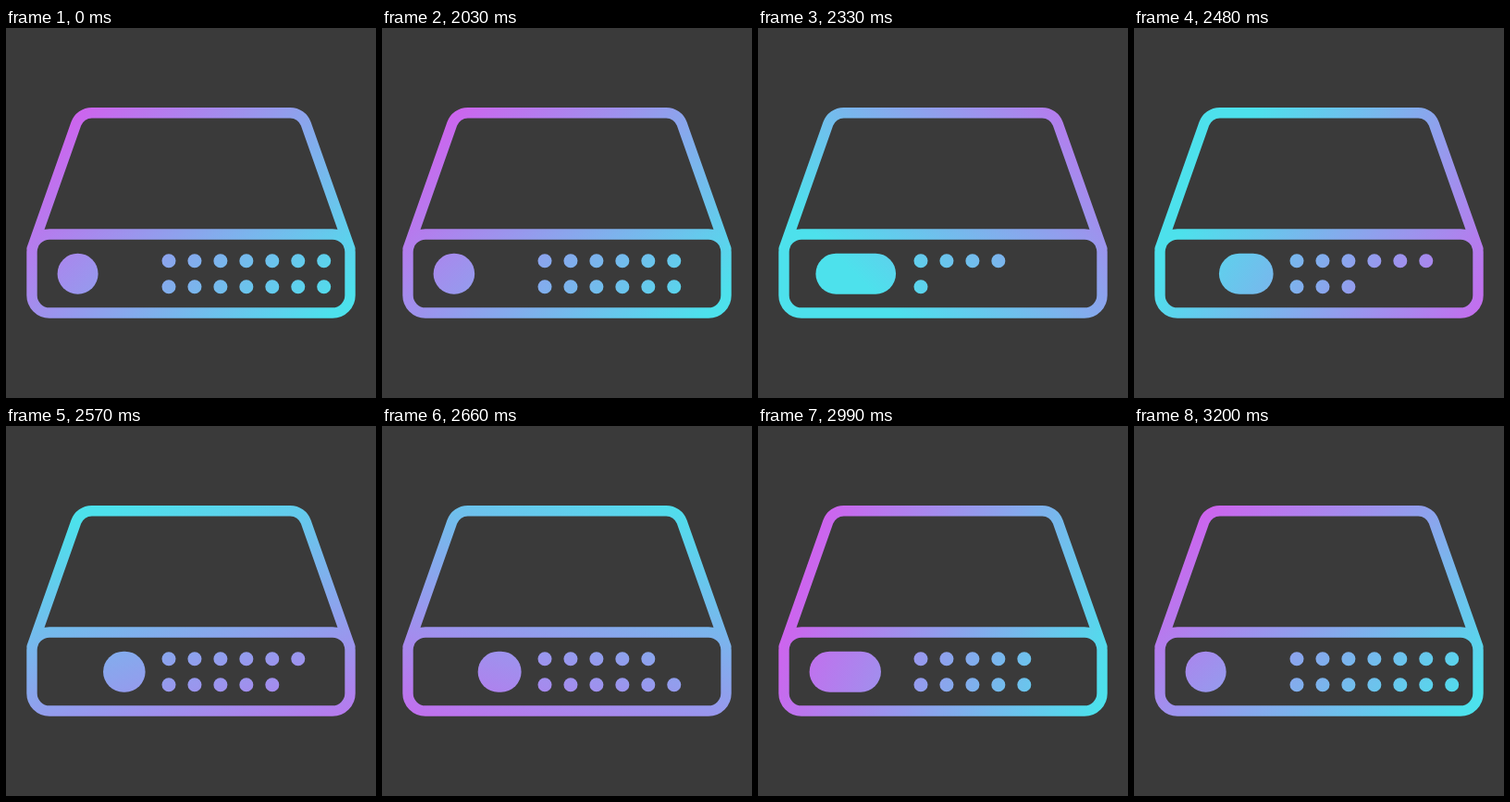
An HTML page with a canvas for the animation above (3.23 s loop, 400 px wide and 400 px high).

```html
<!DOCTYPE html>
<html lang="en">
<head>
<meta charset="utf-8">
<title>Router</title>
<style>
  html, body { margin: 0; width: 100%; height: 100%; overflow: hidden; background: #3a3a3a; }
  canvas { display: block; width: 400px; height: 400px; }
</style>
</head>
<body>
<canvas id="stage" width="400" height="400"></canvas>
<script>
const ctx = document.getElementById('stage').getContext('2d');
const LOOP = 3230, HOLD = 2000, STEP = 30;
const PURPLE = '#cd64ee', CYAN = '#4de1ec';

// Keys are [step, value] pairs.
const ANGLE = [[0, 0], [6, 22], [11, 90], [19, 208], [27, 293], [40, 360]];
const SHIFT = [[0, -10], [6, 15], [11, 60], [19, 45], [27, -20], [40, -10]];
const TOP_ROW = [[0, 1], [7, .35], [18, .95], [28, .55], [40, 1]];
const BOTTOM_ROW = [[0, 1], [10, .1], [22, .85], [30, .6], [40, 1]];

const smooth = u => {
  u = Math.min(1, Math.max(0, u));
  return u * u * (3 - 2 * u);
};
const ramp = (s, from, to) => smooth((s - from) / (to - from));

function segment(keys, s) {
  let i = 0;
  while (i < keys.length - 2 && s >= keys[i + 1][0]) i++;
  return i;
}

function eased(keys, s) {
  const i = segment(keys, s), [a, va] = keys[i], [b, vb] = keys[i + 1];
  return va + (vb - va) * ramp(s, a, b);
}

// Hermite curve through the keys, at rest at both ends.
function spline(keys, s) {
  const slope = j => j === 0 || j === keys.length - 1 ? 0 :
    (keys[j + 1][1] - keys[j - 1][1]) / (keys[j + 1][0] - keys[j - 1][0]);
  const i = segment(keys, s), [a, va] = keys[i], [b, vb] = keys[i + 1];
  const span = b - a, u = (s - a) / span, v = 1 - u;
  return va + (vb - va) * smooth(u) +
    span * u * v * (v * slope(i) - u * slope(i + 1));
}

function gradient(k) {
  const angle = (spline(ANGLE, k) - 135) * Math.PI / 180;
  const shift = spline(SHIFT, k), half = 174;
  const at = d => [200 + d * Math.cos(angle), 200 + d * Math.sin(angle)];
  const g = ctx.createLinearGradient(...at(shift + half), ...at(shift - half));
  g.addColorStop(0, PURPLE);
  g.addColorStop(1, CYAN);
  return g;
}

function drawCase() {
  ctx.lineWidth = 11.4;
  ctx.lineCap = 'round';
  ctx.beginPath();
  ctx.roundRect(28, 223, 344, 85, 19);
  ctx.moveTo(28, 239);
  ctx.arcTo(80, 91.7, 200, 91.7, 18);
  ctx.arcTo(320, 91.7, 372, 239, 18);
  ctx.lineTo(372, 239);
  ctx.stroke();
}

function drawPill(s) {
  const left = 77.6 + 51 * (ramp(s, 8, 20) - ramp(s, 20, 32));
  const right = 77.6 + 51 * (ramp(s, 0, 12) - ramp(s, 28, 40));
  ctx.beginPath();
  ctx.roundRect(left - 22, 243.7, right - left + 44, 44, 22);
  ctx.fill();
}

function drawDots(level, y) {
  const count = Math.floor(level * 6 + 1.01);
  for (let i = 0; i < count; i++) {
    ctx.beginPath();
    ctx.arc(176 + 27.95 * i, y, 7.5, 0, Math.PI * 2);
    ctx.fill();
  }
}

function frame(now) {
  const k = Math.max(0, Math.floor((now % LOOP - HOLD) / STEP));
  const s = Math.max(0, k - .25);
  ctx.fillStyle = '#3a3a3a';
  ctx.fillRect(0, 0, 400, 400);
  ctx.fillStyle = ctx.strokeStyle = gradient(k);
  drawCase();
  drawPill(s);
  drawDots(eased(TOP_ROW, s), 251.7);
  drawDots(eased(BOTTOM_ROW, s), 279.7);
}

let start;
function tick(now) {
  start ??= now;
  frame(now - start);
  requestAnimationFrame(tick);
}
frame(0);
requestAnimationFrame(tick);
</script>
</body>
</html>
```
